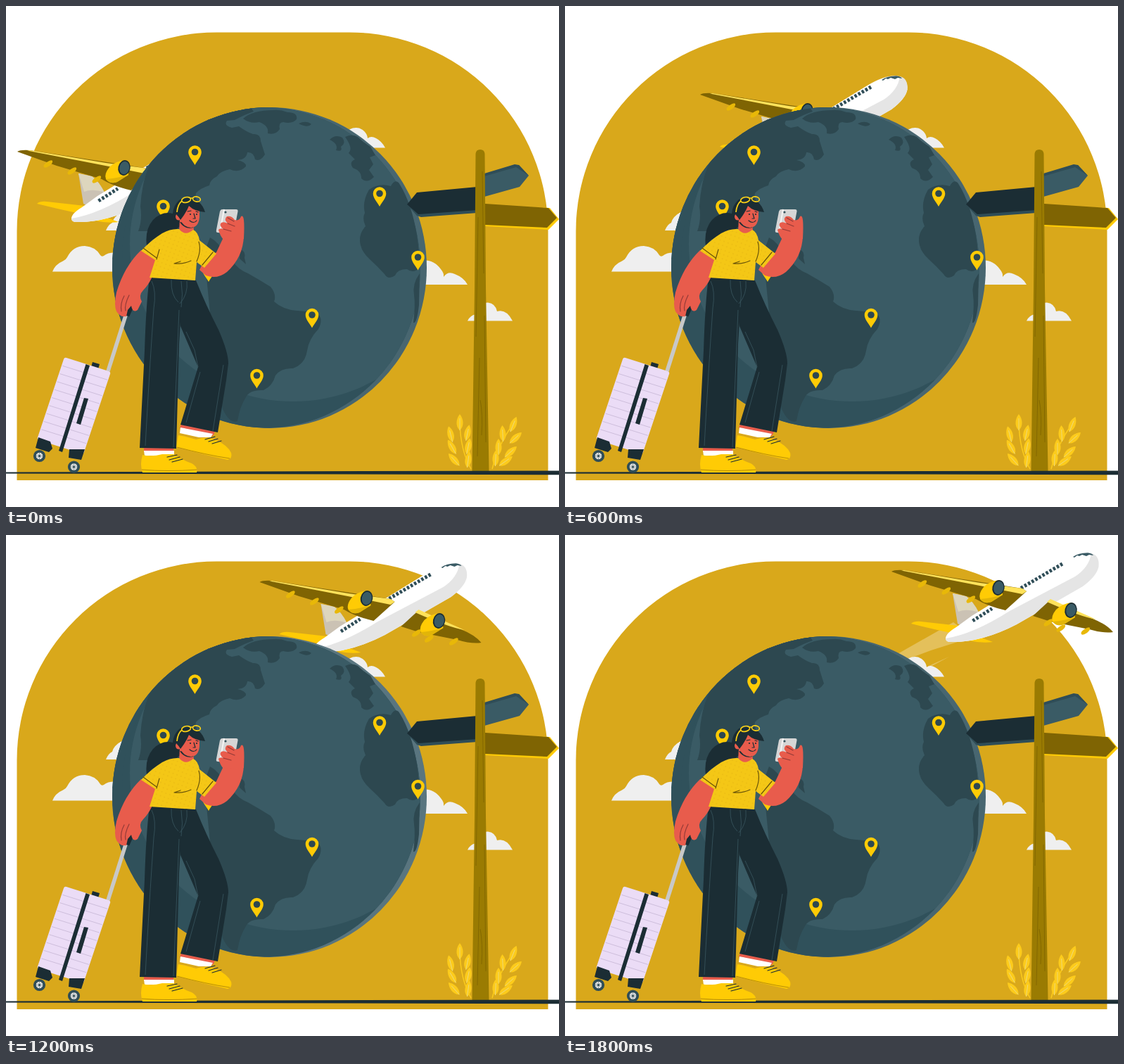
An HTML page that plays this animation: 786x712 px, repeating every 2.1 s.

```html
<!DOCTYPE html>
<html lang="en">
<head>
<meta charset="utf-8">
<title>Traveller and globe</title>
<style>
  html, body { margin: 0; width: 100%; height: 100%; overflow: hidden; background: #fff; }
  svg { display: block; width: 100vw; height: 100vh; }
  .sun { fill: #ffcb05; }
  .gold { fill: #d9a81b; }
  .olive { fill: #7f6403; }
  .ink { fill: #1b2d34; }
  .sea { fill: #3a5b65; }
  .land { fill: #2d4850; }
  .skin { fill: #e85c4c; }
  .cloud { fill: #efefef; }
  .line { fill: none; stroke: #1b2d34; stroke-width: 1.2; stroke-linecap: round; stroke-linejoin: round; }
  .seam { fill: none; stroke: #36525b; stroke-width: 0.9; }
</style>
</head>
<body>
<svg viewBox="0 0 786 712" xmlns="http://www.w3.org/2000/svg">
  <defs>
    <clipPath id="disc"><ellipse cx="374.5" cy="372" rx="223.5" ry="228"/></clipPath>
    <clipPath id="face"><ellipse cx="367" cy="372" rx="222" ry="228"/></clipPath>
    <pattern id="dots" width="6" height="6" patternUnits="userSpaceOnUse" patternTransform="rotate(20)">
      <rect width="6" height="6" fill="#f4c716"/><circle cx="3" cy="3" r="0.6" fill="#dca80f"/>
    </pattern>
    <g id="pin">
      <path class="sun" d="M0 14C-3 8-9.3 2-9.3-4.5A9.3 9.3 0 0 1 9.3-4.5C9.3 2 3 8 0 14Z"/>
      <circle cy="-4.5" r="4.8" fill="#2d4850"/>
    </g>
    <g id="leaf">
      <path fill="#fccb1c" d="M0 11C-7 5-5-6 0-12C5-6 7 5 0 11Z"/>
      <path d="M0 11V-6" fill="none" stroke="#e9dc8d" stroke-width="0.8"/>
    </g>
    <g id="wheel">
      <circle r="8.6" fill="#2f4d57"/><circle r="4.8" fill="#e6e6e6"/>
      <path d="M-4.5 0H4.5M0-4.500V4.500M-3-3L3 3M-3 3L3-3" stroke="#7c8b90" stroke-width="0.8"/>
      <circle r="1.5" fill="#2f4d57"/>
    </g>
    <g id="engine">
      <path class="sun" d="M2-11Q-12-10-21-1Q-29 9-26 16Q-20 24-10 20L6 10Z"/>
      <path d="M-26 16Q-20 24-10 20L6 10Q-11 15-26 16Z" fill="#e2b508"/>
      <ellipse rx="8.6" ry="11" transform="rotate(12)" class="ink"/>
      <ellipse cx="0.3" rx="7" ry="9.3" transform="rotate(12)" class="sea"/>
    </g>
    <path id="pod" d="M-6 5Q-8 2-2-2Q4-6 6-4Q7-1 2 3Q-4 7-6 5Z" fill="#e8b808"/>
  </defs>

  <path class="gold" d="M15.500 674V320A284 282.500 0 0 1 299.500 37.500H488A282.500 282.500 0 0 1 770.500 320V674Z"/>

  <g class="cloud">
    <path d="M66 377.500Q70 367 81 362.500Q85 361 87 357Q95 341 112 341Q127 342 134 354Q136 357 139 355Q148 348 165 352V377.500Z"/>
    <path d="M142 319Q145 311 151 308Q153 299 166 292V319Z"/>
    <path d="M480 201.500V182Q490 171 502 173.500Q513 178 514 188Q519 184 526 188Q534 192 539 201.500Z"/>
    <path d="M585 396V362Q607 358 618 374Q623 380 622 385Q628 376 638 381Q651 386 656 396Z"/>
    <path d="M656 447.500Q659 440 668 438Q672 422 685 421.500Q696 423 698 434Q711 430 720 447.500Z"/>
  </g>

  <path id="trail" d="M464 174L552 124L580 145L520 164L475 181ZM508 190L546 173L520 187Z" fill="#fff"/>

  <g id="plane">
    <path d="M551 83L570 87Q580 94 588 110L566 130L558 126Z" fill="#cbc2b4"/>
    <path d="M551 83L570 87Q580 94 588 110Q571 104 559 109Z" fill="#ddd6bd"/>
    <path class="sun" d="M492 126Q496 122 506 123L560 129L548 139Q520 133 492 126ZM574 148L592 146L608 152Q592 154 574 150Z"/>
    <path fill="#fff" d="M541 147Q541 140 556 131L578 115L700 40Q724 25 743 25Q760 28 758.500 45Q756 58 736 73L642 127Q592 153 548 152Q541 152 541 147Z"/>
    <path fill="#e5e5e5" d="M541 147Q580 141 632 108L725 59Q745 46 748 26Q760 29 758.500 45Q756 58 736 73L642 127Q592 153 548 152Q541 152 541 147Z"/>
    <path d="M579.500 122L607 104.500M648 75.500L707 41" fill="none" stroke="#2f4d57" stroke-width="5" stroke-dasharray="3.5 2.4"/>
    <path class="sea" d="M722 31Q730 25.500 743 25.300Q749 26 751 29L745 28L741 30L735 28L731 30L728 29L724 32Z"/>
    <path class="olive" d="M464 52Q468 49 482 50L650 76L656 80L626 107Q600 101 584 91L520 72Z"/>
    <path fill="#ffe25a" d="M478 50.500L482 50L590 68L650 76L656 80L650 84Q580 70 478 50.500Z"/>
    <path class="olive" d="M665 115L690 92L750 119Q770 127 779 138Q765 140 745 134L690 123Z"/>
    <path fill="#ffe25a" d="M685 95L690 91L755 120Q732 116 685 95Z"/>
    <use href="#pod" x="508" y="69"/><use href="#pod" x="542" y="79"/><use href="#pod" x="577" y="91"/>
    <use href="#pod" x="687" y="124"/><use href="#pod" x="705" y="132"/><use href="#pod" x="740" y="136"/>
    <use href="#engine" x="616" y="75"/><use href="#engine" x="719" y="107"/>
  </g>

  <g clip-path="url(#disc)">
    <rect id="rim" x="150" y="143" width="450" height="460"/>
    <g clip-path="url(#face)">
      <rect x="140" y="140" width="460" height="465" fill="#30515b"/>
      <ellipse cx="408" cy="338" rx="232" ry="224" class="sea"/>
    </g>
    <path fill="#30515b" d="M150 143H375V144Q280 147 215 215Q165 280 165 360H150Z"/>
    <g class="land">
      <path d="M188 320Q194 304 191 285Q193 250 204 226L215 200L270 160L345 140L352 150Q340 154 325 162L314 163Q309 170 321 173L331 171Q342 179 351 182Q362 181 362 192L368 211Q361 222 354 218Q352 207 343 208Q342 218 329 219Q342 222 341 228Q331 238 318 232Q304 235 300 242Q290 247 289 255Q276 259 270 266Q268 274 276 284L250 320Z"/>
      <path d="M337 160Q350 148 380 148Q390 147 400 151Q415 151 413 161Q407 168 394 165Q387 165 389 175Q383 184 372 181Q374 170 360 165Q347 168 337 160Z"/>
      <path d="M416 167Q427 162 434 168Q429 174 416 167Z"/>
      <path d="M460 190Q468 182 478 187Q484 195 476 200Q479 208 469 205Q473 196 460 190Z"/>
      <path d="M482 186Q492 181 500 186Q508 194 518 200L525 212L517 215L522 225L516 233L523 243Q513 253 505 245Q506 235 493 230Q487 222 496 218L487 209Q494 203 482 186Z"/>
      <path d="M516 261Q530 251 547 256Q552 246 558 251Q576 278 584 325Q588 352 588 372Q579 381 570 374Q556 374 553 383Q543 390 538 381Q527 369 517 360Q506 350 504 340Q500 325 511 313Q506 302 510 294Q506 278 516 261Z"/>
      <path d="M588 380Q577 395 580 411Q582 425 579 450Q584 452 587 425Z"/>
      <path d="M285 385L292 366Q306 352 322 362Q329 374 344 380Q360 389 376 399Q385 410 381 420Q394 432 414 433Q433 434 444 438Q451 446 444 459Q430 474 428 490Q425 509 408 515Q391 514 383 525Q379 540 366 546Q346 545 341 556Q332 570 329 590Q318 594 308 573L299 530Z"/>
      <path d="M290 329Q305 337 308 352L294 366L282 350ZM333 346Q341 348 339 358L341 367L332 359Z"/>
    </g>
  </g>

  <g id="pins"></g>

  <g>
    <path class="sea" d="M680 239L723 226L729 226L743 241L730 257L680 271Z"/>
    <path d="M680 238L723 225L729 226L743 241L725 229L680 242Z" fill="#2f4d57"/>
    <path d="M570 282L584 298L590 300L670 294V288Z" fill="#2f4d57"/>
    <path class="ink" d="M570 282L584 265L670 257V290L586 296Z"/>
    <path class="sun" d="M681 283L773 287L786 303L771 318L681 313Z"/>
    <path class="olive" d="M681 281L771 287L783 301L769 315L681 311Z"/>
    <path d="M667.500 210Q668 204 674 204Q680 204 680.500 210L682 400L686.500 661H662.500L666 400Z" fill="#9a7b02"/>
    <path d="M671 300L668 470M677 235L679 380M673 500L670 640M680 440L682 620M674 560Q678 580 676 610" fill="none" stroke="#826600" stroke-width="0.9"/>
  </g>

  <g id="plants"><path d="M661 658Q646 632 645 592M691 658Q700 622 721 594" fill="none" stroke="#fccb1c" stroke-width="1.5"/></g>

  <path class="ink" d="M0 662.400L786 660.400V666.200L0 664.400Z"/>

  <g>
    <path d="M145 519L170 440" stroke="#c8c8c8" stroke-width="5.5" fill="none"/>
    <path d="M172 440L180 422" stroke="#1b2d34" stroke-width="7" fill="none"/>
    <path class="ink" d="M123 506L133 509L131 516L121 513Z"/>
    <path d="M86 500L146 519Q149 520 148 523L111 634Q110 637 107 636L47 617Q44 616 45 613L82 502Q83 499 86 500Z" fill="#ebdcf6"/>
    <path id="ribs" fill="none" stroke="#cabad8" stroke-width="0.9"/>
    <path class="ink" d="M113.500 509L119 511L80 634L75 632ZM111 557L117 558L106 595L100 593ZM46 613L63 619L66 629L61 634L42 628ZM90 630L112 630L107 645L89 642Z"/>
    <use href="#wheel" x="47.500" y="639.500"/><use href="#wheel" x="96.500" y="655"/>
  </g>

  <g>
    <path class="sun" d="M245 610Q258 612 270 616Q286 611 298 617Q315 624 320 635Q322 643 315 645Q278 637 242 627Z"/>
    <path d="M243 627Q285 638 318 643" fill="none" stroke="#b78d08" stroke-width="1"/>
    <path class="skin" d="M249 594L297 605L294 611L247 600Z"/>
    <path d="M248 599L294 608L291 613L274 613L247 607Z" fill="#fff"/>
    <path class="line" d="M283 616L297 612M288 619L301 615M293 622L306 618"/>
    <path class="ink" d="M241 388L270 390Q284 425 302 460Q316 492 316 508L313 532L301 606L248 595L273 513L248 455Z"/>
    <path class="seam" d="M273 513L268 489L256 463M309 510L294 604M256 592L276 520"/>

    <path class="skin" d="M196 628H238V634H196Z"/>
    <path d="M196 632H239V639H197Z" fill="#fff"/>
    <path class="sun" d="M194 638Q207 641 222 637L238 637Q248 644 264 650Q273 655 271 663H194Q190 652 194 638Z"/>
    <path d="M193 659Q230 662 271 659" fill="none" stroke="#b78d08" stroke-width="1"/>
    <path class="line" d="M229 641L243 638M232 645L247 641M236 648L251 644"/>
    <path class="ink" d="M204 385L258 388Q258 416 249 432L246 480L242 629L190 628L197 490Q199 425 204 385Z"/>
    <path class="seam" d="M207 391Q214 405 210 430Q204 515 198 625M235 389Q234 411 245 421M249 391Q252 410 249 428M257 391Q259 410 247 423M246 432L238 627"/>

    <path class="skin" d="M192 347L215 362Q209 390 195 404Q188 411 193 420L187 432Q180 437 178 426L173 432L171 441Q163 443 157 434Q153 425 157 407Q168 370 192 347Z"/>
    <path class="line" d="M168 412Q162 423 164 434M175 411Q168 425 170 433" style="stroke:#923b38"/>

    <path class="ink" d="M247 275Q238 283 237 295Q222 291 209 304Q197 318 200 341Q208 330 220 326Q235 325 246 314Q266 306 272 287Q270 274 258 273Z"/>
    <path class="skin" d="M247 303L246 320Q256 332 267 319L266 309Z"/>
    <path d="M247 307Q254 318 266 315L267 309Z" class="ink"/>
    <path class="skin" d="M248 282Q262 281 275 288L275 300Q274 314 263 315Q252 314 248 304Q241 306 241 299Q242 294 247 295Z"/>
    <path class="ink" d="M241 290Q244 273 260 274Q277 274 283 293Q268 292 260 284Q256 294 248 304Q245 299 242 296Z"/>
    <path class="line" d="M258 292L263 291M270 292L273 293M267 295L269 302L266 302M261 305Q267 310 271 305"/>
    <circle cx="262" cy="296" r="1.1" class="ink"/><circle cx="271" cy="296" r="1.1" class="ink"/>
    <g fill="none" stroke="#fcd116" stroke-width="1.7">
      <ellipse cx="256" cy="275.5" rx="6.5" ry="3.8" transform="rotate(-12 256 275)"/>
      <ellipse cx="271" cy="274.5" rx="5.5" ry="3.5" transform="rotate(12 271 274)"/>
      <path d="M262 273L266 273M250 277Q244 282 243 293"/>
    </g>

    <path class="skin" d="M280 365L299 350L309 329L338 327Q337 357 314 378Q300 389 284 383L275 375Z"/>
    <path d="M307 289H327Q330 289 329.500 292L324 321Q323 324 320 324L301 322Q298 322 299 318L304 292Q305 289 307 289Z" fill="#d6d6d6"/>
    <path d="M310 289L304 322" stroke="#f4f4f4" stroke-width="2" fill="none"/>
    <circle cx="312" cy="293" r="1.6" fill="#34515b"/>
    <path class="skin" d="M309 332Q304 326 302 318Q304 315 309 317Q302 312 306 308Q310 306 315 309Q309 303 314 299Q321 298 325 304Q332 306 334 299Q337 297 338 304Q339 312 338 331Z"/>
    <path class="line" d="M315 309L325 313M309 317L320 320M315 301L324 306" style="stroke:#923b38"/>

    <path fill="url(#dots)" d="M192 348Q206 333 222 323Q234 316 246 317Q255 328 266 318Q273 321 275 333L299 352L282 372L271 364L269 390L204 386L212 361Z"/>
    <path class="line" d="M195 344L214 358M294 350L279 368M239 366Q252 367 263 362M239 366L248 363M274 335Q278 347 271 363M214 360L218 346" style="stroke:#6a5408"/>
  </g>
</svg>
<script>
  const $ = id => document.getElementById(id);
  const place = (href, x, y, turn = 0) =>
    `<use href="#${href}" transform="translate(${x} ${y}) rotate(${turn})"/>`;

  $('pins').innerHTML = [[268.5, 212], [223.5, 289], [531, 271], [585.5, 361.5], [435, 443.5], [356.5, 529.5], [288, 378]]
    .map(([x, y]) => place('pin', x, y)).join('');

  $('plants').innerHTML += [
    [645, 592, 0], [632, 609, -14], [656, 607, 12], [634, 627, -30],
    [657, 626, 12], [637, 645, -42], [657, 645, 8],
    [721, 595, 22], [706, 608, -3], [724, 614, 48], [700, 627, 0],
    [717, 634, 48], [696, 643, 3], [710, 647, 55]
  ].map(p => place('leaf', ...p)).join('');

  // Ribs run parallel to the lid of the case.
  $('ribs').setAttribute('d', Array.from({ length: 9 }, (_, i) => {
    const k = (i + 1) * 11.3;
    return `M${84 - k / 3} ${500 + k}l64 20`;
  }).join(''));

  const STEP = 300;
  // Plane offset, trail opacity and rim colour for each step.
  const steps = [
    { x: -448, y: 155 },
    { x: -357, y: 108 },
    { x: -272, y: 74 },
    { x: -165.5, y: 48.5 },
    { x: -103.5, y: 15, rim: '#59757f' },
    { x: -42, y: 0 },
    { x: 0, y: 0, trail: 0.28 }
  ];

  function draw(now) {
    const { x, y, trail = 0, rim = '#486670' } = steps[Math.floor(now / STEP) % steps.length];
    $('plane').setAttribute('transform', `translate(${x} ${y})`);
    $('trail').setAttribute('opacity', trail);
    $('rim').setAttribute('fill', rim);
  }

  let start;
  function tick(now) {
    start ??= now;
    draw(now - start);
    requestAnimationFrame(tick);
  }
  draw(0);
  requestAnimationFrame(tick);
</script>
</body>
</html>
```
